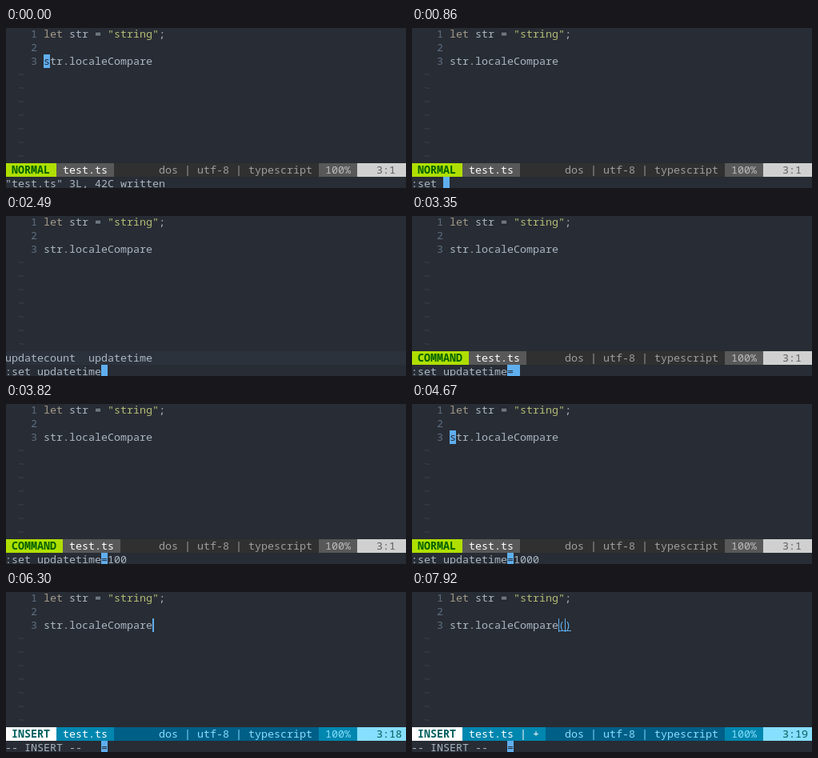
These frames come from a looping animation (500 px wide and 200 px high, 8000 ms). An HTML page with a canvas:

```html
<!DOCTYPE html>
<html lang="en">
<head>
<meta charset="utf-8">
<style>
html, body { margin: 0; width: 100%; height: 100%; overflow: hidden; background: #282c34; }
canvas { display: block; }
</style>
</head>
<body>
<canvas id="screen" width="500" height="200"></canvas>
<script>
const ctx = document.getElementById("screen").getContext("2d");
const LOOP = 8000, CELL = 8, ROW = 17, STATUS = 10, CMD = 11;
const BG = "#282c34", FG = "#a9b7c4", BLUE = "#5fafef";

const x = col => col * CELL - 1;
const y = row => row * ROW - 1;

function fill(col, row, cols, color) {
  ctx.fillStyle = color;
  ctx.fillRect(x(col), y(row), cols * CELL, ROW);
}

function put(col, row, str, color = FG, bg, bold) {
  if (bg) fill(col, row, str.length, bg);
  ctx.font = `${bold ? "bold " : ""}13.333px "Noto Sans Mono", monospace`;
  ctx.fillStyle = color;
  ctx.fillText(str, x(col), y(row) + 13);
}

const cursor = (col, row, char = " ", color = BG) => put(col, row, char, color, BLUE);

function bar(px, width = 2) {
  ctx.fillStyle = BLUE;
  ctx.fillRect(px, y(2), width, ROW);
}

// Latest entry whose time has been reached
const at = (steps, t) => steps.findLast(step => step[0] <= t);

// [time, command line, cursor column if shown]
const commandLine = [
  [0, '"test.ts" 3L, 42C written'],
  [320, ":", 1],
  [470, ":s"],
  [550, ":se"],
  [780, ":set"],
  [860, ":set ", 5],
  [1090, ":set u"],
  [1160, ":set up"],
  [1790, ":set upd", 8],
  [1870, ":set upda"],
  [2110, ":set updatecount", 16],
  [2490, ":set updatetime", 15],
  [3350, ":set updatetime=", 16],
  [3580, ":set updatetime=1"],
  [3730, ":set updatetime=10"],
  [3820, ":set updatetime=100"],
  [4350, ":set updatetime=1000"],
  [6300, "-- INSERT --"]
];

const normalColors = {
  mode: ["#005f00", "#afdf00"], file: ["#ffffff", "#585858"], middle: ["#9e9e9e", "#303030"],
  percent: ["#bcbcbc", "#585858"], position: ["#606060", "#d0d0d0"]
};
const insertColors = {
  mode: ["#005f5f", "#ffffff"], file: ["#ffffff", "#0087af"], middle: ["#87dfff", "#005f87"],
  percent: ["#87dfff", "#0087af"], position: ["#005f5f", "#87dfff"]
};

function drawStatus(mode, file, position) {
  const colors = mode === "INSERT" ? insertColors : normalColors;
  const label = ` ${mode} `;
  fill(0, STATUS, 63, colors.middle[1]);
  put(0, STATUS, label, ...colors.mode, true);
  put(label.length, STATUS, ` ${file} `, ...colors.file);
  put(24, STATUS, "dos | utf-8 | typescript", colors.middle[0]);
  put(49, STATUS, " 100% ", ...colors.percent);
  put(55, STATUS, `   ${position}`.padEnd(8), ...colors.position);
}

function drawCode(t) {
  for (let row = 0; row < 3; row++) put(4, row, String(row + 1), "#5c6f82");
  for (let row = 3; row < STATUS; row++) put(2, row, "~", "#3f4650");
  put(6, 0, "let", "#a39b8b");
  put(10, 0, "str = ");
  put(16, 0, '"string"', "#b3bd75");
  put(24, 0, ";");
  put(6, 2, "str.localeCompare");

  if (t < 320 || (t >= 4670 && t < 6300)) {
    cursor(6, 2, "s", t >= 5740 && t < 5970 ? FG : BG);
  }
  if (t >= 7230) {
    put(23, 2, "()", BLUE);
    ctx.fillRect(x(23), 48, 2 * CELL, 1);
    bar(x(24), t < 7920 ? 2 : 1);
  }
  if (t >= 6300) bar(x(23), t < 7230 ? 2 : 1);
}

function drawCommand(t) {
  const [, line, col] = at(commandLine, t);
  put(0, CMD, line);
  if (col) cursor(col, CMD);
  if (t >= 3350) cursor(15, CMD, "=");
}

function draw(t) {
  ctx.fillStyle = BG;
  ctx.fillRect(0, 0, 500, 200);
  drawCode(t);
  if (t >= 2110 && t < 3350) {
    fill(0, STATUS, 63, "#2c323c");
    put(0, STATUS, "updatecount  updatetime");
  } else {
    const mode = t < 2110 ? "NORMAL" : t < 4670 ? "COMMAND" : t < 6300 ? "NORMAL" : "INSERT";
    const position = t < 6300 ? "3:1" : t < 7230 ? "3:18" : "3:19";
    drawStatus(mode, t < 7230 ? "test.ts" : "test.ts | +", position);
  }
  drawCommand(t);
}

const start = performance.now();
function tick() {
  draw((performance.now() - start) % LOOP);
  requestAnimationFrame(tick);
}
tick();
</script>
</body>
</html>
```
